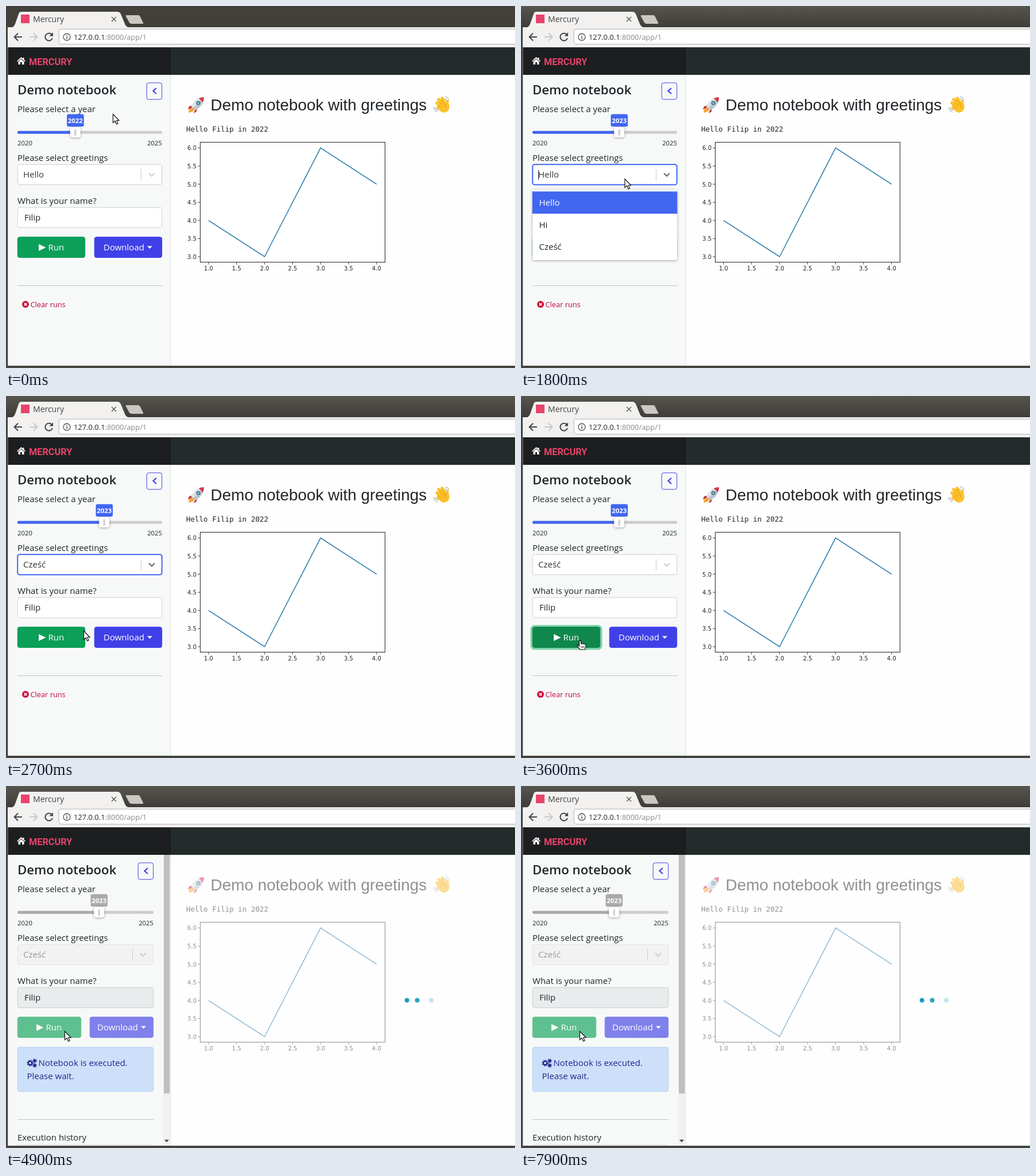
Write an HTML page that moves like this. It is 887 by 631 pixels and loops after 8000 ms.

```html
<!DOCTYPE html>
<html lang="en">
<head>
<meta charset="utf-8">
<title>Demo notebook</title>
<style>
html, body { margin: 0; width: 100%; height: 100%; overflow: hidden; background: #fefefe; }
svg { display: block; width: 887px; height: 631px; font: 500 15px "Open Sans", "Noto Sans", sans-serif; fill: #212529; }
.mono { font: 12.5px "DejaVu Sans Mono", monospace; }
.tick { font: 10px "DejaVu Sans", sans-serif; }
.h1 { font: 27.9px "Liberation Sans", Arial, sans-serif; }
.logo { font: bold 16.3px Roboto, sans-serif; fill: #e8436b; }
.title { font-weight: 600; font-size: 22.2px; }
.small { font-size: 11.3px; }
.mid { font-size: 12.8px; }
.url { font-size: 12.9px; font-weight: 400; }
.badge { font-weight: 700; font-size: 11.4px; fill: #fff; text-anchor: middle; }
.line { fill: none; stroke: #333; }
.shadow { filter: drop-shadow(0 1px 2px rgba(0, 0, 0, .35)); }
</style>
</head>
<body>
<svg id="stage" viewBox="0 0 887 631"></svg>
<script>
const stage = document.getElementById('stage');
const BLUE = '#4166f0', INDIGO = '#4040e8', GREEN = '#0b9f58';
const NAME = 'Filip', LOOP = 8000, STEP = 100;

const rect = (x, y, w, h, fill, more = '') =>
  `<rect x="${x}" y="${y}" width="${w}" height="${h}" fill="${fill}" ${more}/>`;
const box = (x, y, x2, y2, fill, stroke, width = 1) =>
  rect(x + .2, y + .2, x2 - x - .5, y2 - y - .7, fill, `rx="3.5" stroke="${stroke}" stroke-width="${width}"`);
const text = (x, y, s, more = '') => `<text x="${x}" y="${y}" ${more}>${s}</text>`;
const path = (d, fill, more = '') => `<path d="${d}" fill="${fill}" ${more}/>`;
const line = (d, stroke, width = 1, more = '') =>
  `<path d="${d}" class="line" style="stroke:${stroke};stroke-width:${width}" ${more}/>`;
const circle = (x, y, r, fill, more = '') => `<circle cx="${x}" cy="${y}" r="${r}" fill="${fill}" ${more}/>`;
const group = (body, more) => `<g ${more}>${body}</g>`;
const clamp = v => Math.max(0, Math.min(1, v));

// Cursor moves: start, end, x, y
const moves = [
  [200, 600, 121, 219], [600, 900, 171, 222], [900, 1000, 172, 224],
  [1100, 1200, 174, 237], [1200, 1700, 180.5, 301], [2000, 2200, 181, 390],
  [2300, 2400, 175, 418], [2400, 2700, 135, 409], [2800, 2900, 136, 407],
  [3000, 3200, 103, 426], [3600, 3700, 102, 427]
];

function cursor(t) {
  let x = 186, y = 188;
  for (const [a, b, x2, y2] of moves) {
    const k = clamp((t - a) / (b - a)), e = k * (2 - k);
    x += (x2 - x) * e;
    y += (y2 - y) * e;
  }
  const hand = (t >= 500 && t < 1300) || (t >= 3200 && t < 3700);
  const shape = hand
    ? path('M-1.500 1Q0-.5 1.500 1V6H6Q10 6.500 10 9V12L8 16H0L-5 10Q-6 8-4 8L-1.500 10Z', '#fff', 'stroke="#111" stroke-width="1.200"') +
      line('M2 10V13M4.500 10V13M7 10V13', '#111')
    : path('M.5.5V15.500L4 12.300L6.500 18L9 17L6.700 11.500H11Z', '#fff', 'stroke="#111" stroke-width="1.200"');
  return group(shape, `transform="translate(${x} ${y})"`);
}

function browser(focused) {
  return `<linearGradient id="bar" x2="0" y2="1"><stop stop-color="${focused ? '#56554e' : '#42413c'}"/>` +
    `<stop offset="1" stop-color="${focused ? '#3e3d39' : '#403f3a'}"/></linearGradient>` +
    rect(0, 0, 887, 631, '#45443f') + rect(0, 0, 887, 37, 'url(#bar)') +
    rect(3, 37, 884, 35, '#f2f1f0') + rect(3.5, 72, 884, 555, '#fefefe') +
    path('M11 37Q14 36 16 31L22 14Q23 10 27 10H194Q198 10 200 14L207 31Q209 36 213 37Z', '#f2f1f0') +
    path('M210 16H230Q233 16 234 19L239 29Q240 31 237 31H219Q216 31 215 29L209 18Q208 16 210 16Z', '#cbc8c4') +
    rect(26, 15, 15, 15, '#e8436b') + text(47, 28, 'Mercury', 'font-size="14" font-weight="400" fill="#444"') +
    line('M184 19L192 27M192 19L184 27', '#555', 1.4) +
    line('M28 54H15M21 47.500L14.500 54L21 60.500', '#444', 2) +
    line('M41 54H54M48 47.500L54.500 54L48 60.500', '#c8c8c8', 2) +
    line('M80 50A6.500 6.500 0 1 0 81 56', '#444', 2) + path('M82 46V52.500H75.500Z', '#444') +
    box(92, 40, 900, 67, '#fff', '#b4b2b0') +
    circle(106, 54, 6, 'none', 'stroke="#555" stroke-width="1.300"') + rect(105.3, 53, 1.5, 4.5, '#555') + rect(105.3, 50.5, 1.5, 1.5, '#555') +
    text(118, 59, '127.0.0.1<tspan fill="#888">:8000/app/1</tspan>', 'class="url"') +
    rect(3.5, 72, 283.5, 48, '#1d1e20') + rect(287, 72, 600, 48, '#232b2b') + rect(286, 72, 1, 48, '#151717') +
    path('M26.500 89L34 96L33 97L26.500 91.500L20 97L19 96ZM26.500 92.500L31.500 97V102H28V98H25V102H21.500V97ZM29.500 90H31.500V93.500L29.500 92Z', '#fff') +
    text(40, 103, 'MERCURY', 'class="logo"');
}

const rocket =
  path('M326 173L319 175L317 181Q322 177 327 178ZM333 178L332 184L327 187Q330 181 329 178Z', '#c22f45') +
  path('M325 176Q319 178 318 186Q326 185 329 180Z', '#f6a52c') +
  path('M345 159Q331 159 323 175L330 182Q345 173 345 159Z', '#b9c5cc') +
  path('M345 159Q331 159 323 175L326 178Z', '#dce4e8') +
  path('M345 159Q340 159 336 161L343 168Q345 164 345 159Z', '#d9364f') +
  circle(335, 169, 3.5, '#47606e') + circle(335, 169, 2.2, '#75b8d8');

const wave =
  line('M753 177L762 183M751 169L761 177M754 163L763 173M760 161L766 171', '#fbc02d', 5.5, 'stroke-linecap="round"') +
  path('M751 175L763 166L766 170Q767 164 770 163Q773 164 771 169Q775 177 770 183Q764 188 757 183Z', '#fbc02d') +
  line('M752 172L759 179M754 166L762 175M758 163L765 172M766 170Q764 174 767 178', '#e59600', .9) +
  line('M765 158Q770 159 772 163M764 162Q767 162 768 165M745 176Q746 182 752 185M748 177Q749 180 753 182', '#a4adb2', 1.2);

function output() {
  const px = v => 353 + (v - 1) * 97.6, py = v => 437 - (v - 3) * 63.2;
  let s = rocket + text(356.5, 182, 'Demo notebook with greetings', 'class="h1"') + wave +
    text(314, 219, `Hello ${NAME} in 2022`, 'class="mono"') +
    rect(338.5, 237.5, 322, 209, '#fff', 'stroke="#222"');
  for (let v = 1; v <= 4; v += .5)
    s += line(`M${px(v)} 447V450.500`, '#222', .9) +
      text(px(v), 461, v.toFixed(1), 'class="tick" text-anchor="middle"');
  for (let v = 3; v <= 6; v += .5)
    s += line(`M338 ${py(v)}H334.500`, '#222', .9) +
      text(332, py(v) + 4, v.toFixed(1), 'class="tick" text-anchor="end"');
  const points = [4, 3, 6, 5].map((v, i) => px(i + 1) + ' ' + py(v));
  return s + line('M' + points.join('L'), '#2878aa', 1.5);
}

// Three bullets slide in from the right one after another, rest, then fade together
function loader(t) {
  if (t < 4300) return '';
  const u = (t - 4300) % 3000;
  return [698, 712, 727].map((x, i) => {
    const k = clamp((u - i * 250) / 900);
    const alpha = Math.min(clamp(k * 2.4), clamp((2200 - u) / 450));
    return circle(x + 20 * (1 - k) ** 3, 373.5, 4, '#1b9dbf', `opacity="${alpha}"`);
  }).join('');
}

function slider(right, year, active, off) {
  const x = 20 + (right - 20) * (year - 2020) / 5, color = off ? '#aaa' : BLUE;
  return rect(20, 217.7, right - 20, 5, '#ccc', 'rx="2"') + rect(20, 217.7, x - 20, 5, color, 'rx="2"') +
    rect(x - 14.7, 188.5, 29.6, 21.7, color, 'rx="3"') + text(x, 203.5, year, 'class="badge"') +
    rect(x - 9, 211, 18, 18, '#fff', 'rx="4" class="shadow"') +
    (active ? rect(x - 8, 212, 16, 16, '#fff', `rx="3" stroke="${BLUE}" stroke-width="2"`) : '') +
    rect(x - 1.5, 215, 3, 11, '#ccc') +
    text(20, 243, '2020', 'class="small"') + text(right, 243, '2025', 'class="small" text-anchor="end"');
}

function select(right, value, focus, caret, off) {
  const x = right - 18, tone = focus ? '#666' : '#ccc';
  return box(20, 276, right, 312, off ? '#f2f2f2' : '#fff', focus ? BLUE : off ? '#e2e2e2' : '#ccc', focus ? 2 : 1) +
    text(30, 299, value, `fill="${off ? '#999' : '#333'}"`) + (caret ? rect(30, 286, 1, 17, '#222') : '') +
    rect(right - 37, 284, 1, 20, '#ccc') + line(`M${x - 5} 291.500L${x} 296.500L${x + 5} 291.500`, tone, 2);
}

function menu(active) {
  return rect(20, 320, 252.3, 123, '#fff', 'rx="4" class="shadow"') +
    ['Hello', 'Hi', 'Cześć'].map((s, i) => {
      const on = i === active, y = 323.3 + i * 38.5;
      return (on ? rect(19.8, y, 252.5, 38.7, BLUE) : '') + text(31.5, y + 25, s, on ? 'fill="#fff"' : '');
    }).join('');
}

function buttons(right, off, press) {
  const w = off ? 111 : 118, dx = off ? -4 : 0, left = right - w, d = off ? 160 : 171;
  const ring = press ? rect(18.5, 401.3, 121, 39.2, 'none', `rx="5" stroke="#7fd3ab" stroke-width="4" opacity="${press}"`) : '';
  const green = off ? '#5fc08f' : press ? '#10874c' : GREEN, blue = off ? '#8080ec' : INDIGO;
  return ring + box(20, 402.5, 20 + w, 439, green, green) +
    path(`M${57 + dx} 415L${69.5 + dx} 421L${57 + dx} 427Z`, '#fff') + text(73.5 + dx, 426, 'Run', 'fill="#fff"') +
    box(left, 402.5, right, 439, blue, blue) + text(d - 1, 426, 'Download', 'fill="#fff"') +
    path(`M${d + 75} 418.500H${d + 84}L${d + 79.5} 423Z`, '#fff');
}

const gear = (x, y, r) => circle(x, y, r, 'none', 'stroke="#24248a" stroke-width="2.200"') +
  circle(x, y, r + 1.7, 'none', `stroke="#24248a" stroke-width="1.600" stroke-dasharray="${(r + 1.7) * Math.PI / 8}"`);

const clearRuns = y => circle(34, y, 6, '#d0103c') +
  line(`M31.800 ${y - 2.2}L36.200 ${y + 2.2}M36.200 ${y - 2.2}L31.800 ${y + 2.2}`, '#fff', 1.8) +
  text(42.5, y + 5, 'Clear runs', 'class="mid" fill="#be0a44"');

function sidebar(t) {
  const off = t >= 3700, right = off ? 257 : 272, listed = t >= 4300;
  const open = t >= 1700 && t < 2500, focus = t >= 1700 && t < 3500;
  let s = rect(3.5, 120, 283.5, 507, '#f7f9f8') + rect(286.5, 120, 1, 507, '#dee2e2') +
    text(20, 154, 'Demo notebook', 'class="title"') +
    box(right - 27, 133.7, right, 163.3, 'none', INDIGO) +
    line(`M${right - 10} 143L${right - 15.5} 148L${right - 10} 153`, INDIGO, 2.2) +
    text(20, 185, 'Please select a year') +
    slider(right, t < 800 ? 2022 : 2023, t >= 600 && t < 1700, off) +
    text(20, 269.5, 'Please select greetings') +
    select(right, t < 2500 ? 'Hello' : 'Cześć', focus, open, off) +
    text(20, 344.5, 'What is your name?') +
    box(20, 351, right, 387, off ? '#e8ecec' : '#fff', '#ccd0d2') + text(32, 374, NAME) +
    buttons(right, off, t < 3500 || off ? 0 : t < 3600 ? .5 : 1);
  const hr = off ? 581 : 487;
  s += rect(20, hr, right - 20, 1, '#bfc3c3');
  if (!listed) s += clearRuns(hr + 33);
  if (off) s += box(20, 455, 257, 533, '#cce0fa', '#b2cdf0') +
    gear(42, 483, 3.2) + gear(50, 479, 1.4) + gear(50, 487, 1.4) +
    text(56.5, 488, 'Notebook is executed.', 'fill="#24248a"') +
    text(36.5, 511, 'Please wait.', 'fill="#24248a"') +
    rect(274, 120, 13, 507, '#f1f1f0') + rect(275, 120, 10.5, listed ? 416 : 470, '#bfbfbf') +
    path('M276 616.500H284L280 621Z', '#444');
  if (listed) s += text(20, 618, 'Execution history') + rect(20, 625, 237, 1, '#d5d9d9');
  if (open) s += menu(t < 2100 ? 0 : t < 2400 ? 1 : 2);
  return s;
}

function render(t) {
  const fade = t < 3700 ? 1 : t < 3800 ? .75 : .5;
  stage.innerHTML = browser(t >= 600) + group(output(), `opacity="${fade}"`) + loader(t) + sidebar(t) + cursor(t);
}

let shown = -1;
function tick(now) {
  const t = Math.floor(now % LOOP / STEP) * STEP;
  if (t !== shown) render(shown = t);
  requestAnimationFrame(tick);
}
tick(performance.now());
</script>
</body>
</html>
```
